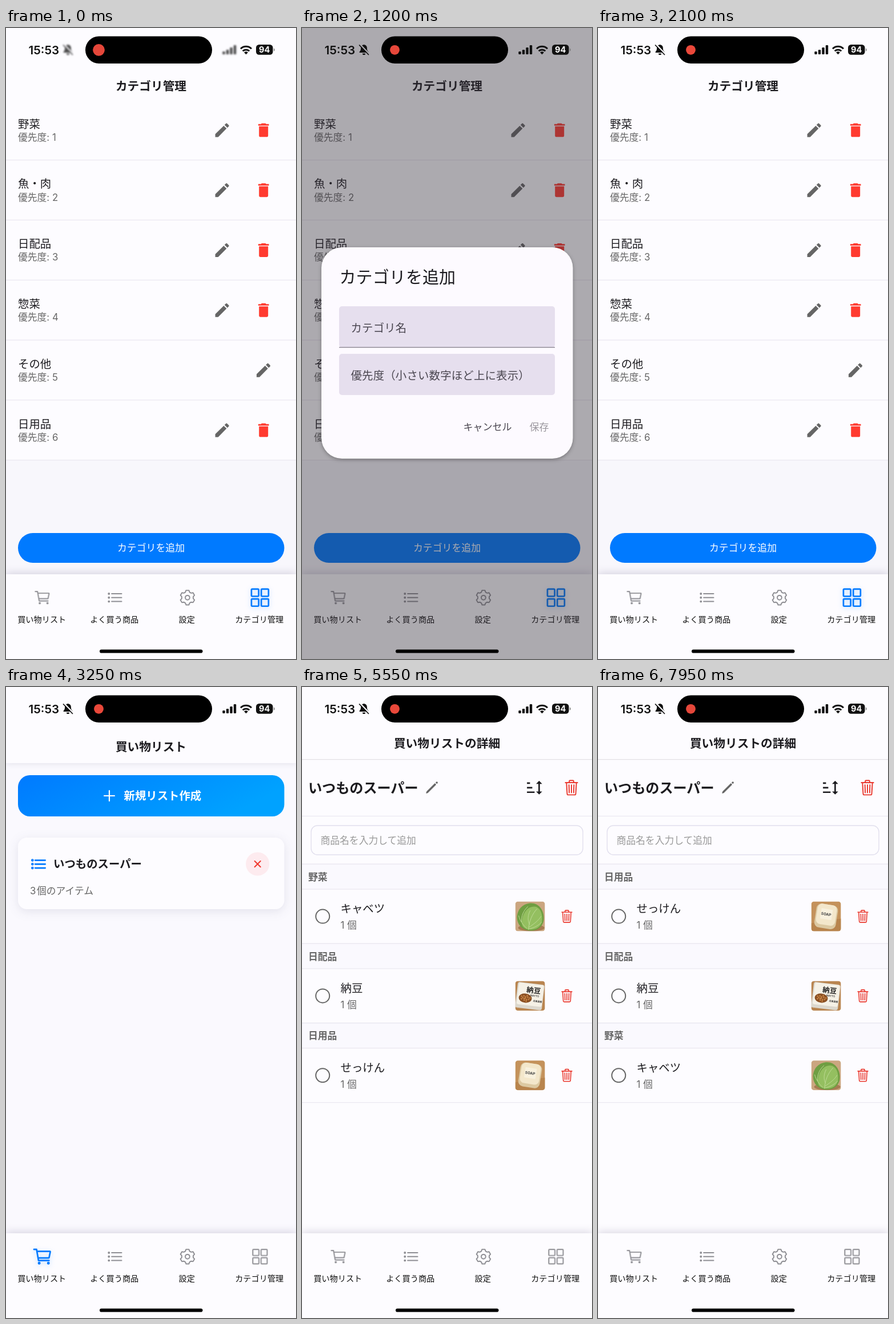
Write an HTML page that moves like this. It is 508 px wide and 1102 px high and loops after 8000 ms.

```html
<!DOCTYPE html>
<html lang="ja">
<head>
<meta charset="utf-8">
<title>買い物リスト</title>
<style>
  html, body { margin: 0; width: 100%; height: 100%; overflow: hidden; background: #fdfcff; }
  svg { display: block; width: 100%; height: 100%; }
  text { font-family: Inter, "Noto Sans CJK JP", "Noto Sans CJK", sans-serif; white-space: pre; }
  .line { fill: none; stroke-linecap: round; stroke-linejoin: round; }
  .bar { filter: drop-shadow(0 -3px 7px rgba(60, 45, 95, .17)); }
  .card { filter: drop-shadow(0 4px 9px rgba(50, 45, 90, .11)); }
  .glow { filter: drop-shadow(0 2px 4px rgba(0, 122, 255, .25)); }
  .head { filter: drop-shadow(0 2px 4px rgba(50, 45, 90, .1)); }
  .pop { filter: drop-shadow(0 2px 3px rgba(50, 40, 90, .38)); }
  .sheet { filter: drop-shadow(0 2px 3px rgba(0, 0, 0, .3)); }
  #menu { transform-origin: 441px 141px; }
</style>
</head>
<body>
<svg id="stage" viewBox="0 0 508 1102" preserveAspectRatio="none"></svg>
<script>
const LOOP = 8000;
const BG = '#fdfcff', SOFT = '#faf9fe', INK = '#1c1b1f', GREY = '#666', BLUE = '#007aff', RED = '#ff3b30';

// ---- drawing helpers ----
// Text is placed by the vertical middle of its characters.
const text = (x, mid, str, size, { fill = INK, weight = 400, anchor = 'start', gap = 0 } = {}) =>
  `<text x="${x}" y="${mid + size * 0.38}" font-size="${size}" fill="${fill}" font-weight="${weight}" text-anchor="${anchor}" letter-spacing="${gap}">${str}</text>`;
const rect = (x, y, w, h, r, fill, extra = '') =>
  `<rect x="${x}" y="${y}" width="${w}" height="${h}" rx="${r}" fill="${fill}" ${extra}/>`;
const rule = (y, color = '#eae7f0') => rect(0, y - 0.6, 508, 1.2, 0, color);
const group = (id, body, extra = '') => `<g id="${id}" ${extra}>${body}</g>`;
const at = (cx, cy, scale, box, body, extra = '') =>
  `<g transform="translate(${cx} ${cy}) scale(${scale}) translate(${-box / 2} ${-box / 2})" ${extra}>${body}</g>`;
const outline = (cx, cy, size, body, color, width = 32) =>
  at(cx, cy, size / 512, 512, body, `class="line" stroke="${color}" stroke-width="${width}"`);

// ---- icons ----
const pencil = (x, y) => at(x, y, 1.34, 24,
  '<path d="M20.7 7a1 1 0 0 0 0-1.4l-2.3-2.3a1 1 0 0 0-1.4 0l-1.9 1.8 3.8 3.8zM3 17.2V21h3.8L17.8 9.9 14.1 6.2z"/>', `fill="${GREY}"`);
const bin = (x, y) => at(x, y, 1.33, 24,
  '<path d="M19 4h-3.5l-1-1h-5l-1 1H5v2h14zM6 19a2 2 0 0 0 2 2h8a2 2 0 0 0 2-2V7H6z"/>', `fill="${RED}"`);
const sorter = (x, y) => at(x, y, 1.33, 24,
  '<path d="M18 21l-4-4h3V7h-3l4-4 4 4h-3v10h3M2 19v-2h10v2M2 13v-2h7v2M2 7V5h4v2z"/>', `fill="${INK}"`);
const trash = (x, y, size) => outline(x, y, size,
  '<path d="M112 112l20 320c1 18 14 32 32 32h184c18 0 31-14 32-32l20-320M80 112h352M192 112V72a24 24 0 0 1 24-24h80a24 24 0 0 1 24 24v40M256 176v224M184 176l8 224M328 176l-8 224"/>', '#ea392f');

const gearPath = () => {
  const pts = [];
  for (let k = 0; k < 6; k++)
    for (const [deg, r] of [[-21, 168], [-11.4, 214], [11.4, 214], [21, 168]]) {
      const a = (k * 60 + deg) * Math.PI / 180;
      pts.push(`${(256 + r * Math.sin(a)).toFixed(1)} ${(256 - r * Math.cos(a)).toFixed(1)}`);
    }
  return `M${pts.join('L')}Z`;
};
const shapes = {
  cart: '<path d="M48 80h64l48 272h256M160 288h249a8 8 0 0 0 8-6l29-144a8 8 0 0 0-8-10H128"/><circle cx="176" cy="416" r="16"/><circle cx="400" cy="416" r="16"/>',
  list: [144, 256, 368].map(y => `<path d="M160 ${y}h288"/><circle cx="80" cy="${y}" r="16"/>`).join(''),
  gear: `<path d="${gearPath()}"/><circle cx="256" cy="256" r="64"/>`,
  grid: [[48, 48], [288, 48], [48, 288], [288, 288]].map(([x, y]) => rect(x, y, 176, 176, 20, 'none')).join('')
};

// ---- thumbnails ----
const photos = {
  soap: rect(0, 0, 52, 52, 0, '#c4925b') + '<path d="M0 38L52 30V52H0z" fill="#b8844d"/>' +
    '<g transform="rotate(9 26 26)">' + rect(7, 5, 38, 42, 9, '#dcc9a2') + rect(9, 5, 34, 36, 8, '#f3e7cb') +
    rect(16, 13, 20, 18, 1, '#f8f1de') + text(25.5, 22, 'SOAP', 6.5, { weight: 700, anchor: 'middle', fill: '#444' }) + '</g>',
  natto: rect(0, 0, 52, 52, 0, '#b98550') + '<g transform="rotate(7 26 26)">' + rect(2, 4, 47, 45, 4, '#dcd8ce') +
    rect(4, 5, 44, 38, 3, '#f5f1e6') + text(31, 15.5, '納豆', 12.5, { weight: 900, anchor: 'middle', fill: '#222' }) +
    text(34, 25, 'NATTO', 4.5, { weight: 600, anchor: 'middle', fill: '#333' }) +
    '<ellipse cx="18" cy="31" rx="11.5" ry="8" fill="#8a4f22"/>' +
    Array.from({ length: 14 }, (_, i) => `<circle cx="${18 + 2.3 * Math.sqrt(i) * Math.cos(i * 2.4)}" cy="${31 + 1.6 * Math.sqrt(i) * Math.sin(i * 2.4)}" r="1.4" fill="#c58243"/>`).join('') +
    text(32, 34, '北海道産', 4, { weight: 700, fill: '#333' }) + '</g>',
  cabbage: rect(0, 0, 52, 52, 0, '#cba680') + '<ellipse cx="28" cy="46" rx="23" ry="6" fill="#a67c52"/>' +
    '<path d="M3 27C4 12 15 3 28 3S50 15 50 29 40 51 27 51 3 42 3 27z" fill="#6f9e42"/>' +
    '<path d="M12 32C14 17 24 8 34 9S48 22 47 33 36 50 25 49 10 42 12 32z" fill="#94bf60"/>' +
    '<path class="line" stroke="#bcd993" stroke-width="1" d="M23 49C24 36 29 22 38 13M25 40C21 32 22 24 26 16M24 45C33 39 41 33 45 26M24 48C33 46 41 42 46 36M20 47C14 41 8 34 6 25M11 36C10 26 14 16 22 9"/>'
};
const photo = (name, y) => `<g transform="translate(373.6 ${y - 26})" clip-path="url(#thumb)">${photos[name]}</g>`;

// ---- category page ----
const categoryPage = () => {
  const names = ['野菜', '魚・肉', '日配品', '惣菜', 'その他', '日用品'];
  const rows = names.map((name, i) => {
    const y = 178.4 + i * 104.8;
    const icons = name === 'その他' ? pencil(451, y) : pencil(378.6, y) + bin(451.2, y);
    return text(21, y - 11.2, name, 19.4) + text(21, y + 12, `優先度: ${i + 1}`, 16.8, { fill: GREY }) + icons + rule(y + 52.2);
  });
  return rect(0, 0, 508, 1102, 0, BG) + rect(0, 754, 508, 200, 0, '#f8f7fc') +
    text(254, 101, 'カテゴリ管理', 20.7, { weight: 600, anchor: 'middle' }) + rows.join('') +
    rect(21, 882, 466.5, 52, 26, BLUE) +
    text(254, 908, 'カテゴリを追加', 16.9, { fill: '#fff', weight: 500, anchor: 'middle' });
};

// ---- list page ----
const listPage = () =>
  rect(0, 0, 508, 1102, 0, SOFT) + rect(0, 0, 508, 133, 0, BG, 'class="head"') +
  text(254, 104.5, '買い物リスト', 20.7, { weight: 600, anchor: 'middle' }) +
  rect(21, 154, 466.5, 72, 21, 'url(#sky)') +
  '<path class="line" stroke="#fff" stroke-width="2.2" d="M172 190h18M181 181v18"/>' +
  text(206.5, 190, '新規リスト作成', 19.4, { fill: '#fff', weight: 600 }) +
  rect(21, 263, 466.5, 125, 15.5, BG, 'class="card"') +
  outline(57, 309.3, 31, shapes.list, BLUE, 46) +
  text(83, 309, 'いつものスーパー', 19.4, { weight: 600 }) +
  '<circle cx="440.7" cy="309" r="20.6" fill="#fdebef"/><path class="line" stroke="#f0392f" stroke-width="2" d="M435.6 304l10.2 10.2M445.8 304l-10.2 10.2"/>' +
  text(42, 356, '3', 16.8, { fill: GREY }) + text(54, 356, '個のアイテム', 16.8, { fill: GREY });

// ---- detail page ----
const items = { soap: 'せっけん', natto: '納豆', cabbage: 'キャベツ' };
const sections = { soap: '日用品', natto: '日配品', cabbage: '野菜' };
const itemRow = (key, y) =>
  `<circle cx="36.2" cy="${y}" r="12" fill="none" stroke="${GREY}" stroke-width="2"/>` +
  text(67.5, y - 13.5, items[key], 19.4) + text(67.5, y + 15.3, '1 個', 16.8, { fill: GREY }) +
  photo(key, y) + trash(464, y, 25.9) + rule(y + 47.5);
const plainRows = keys => keys.map((key, i) => itemRow(key, 356.6 + i * 95)).join('');
const groupedRows = keys => keys.map((key, i) => {
  const top = 309.3 + i * 138.8;
  return rect(0, top, 508, 43.6, 0, SOFT) + text(11, top + 22.2, sections[key], 16.8, { fill: GREY, weight: 600 }) +
    rule(top) + rule(top + 43.8) + itemRow(key, top + 91.3);
}).join('');

const detailPage = () =>
  rect(0, 0, 508, 1102, 0, BG) + rule(126.6, '#e2dfe5') +
  text(254, 98, '買い物リストの詳細', 20.7, { weight: 600, anchor: 'middle' }) +
  text(11, 176, 'いつものスーパー', 24.1, { weight: 600 }) +
  at(227.6, 175.5, 26 / 512, 512,
    '<path d="M359 129L86 402 70 442l40-16 273-272zM413 75l-12 12 24 24 12-12a16 16 0 0 0 0-23l-1-1a16 16 0 0 0-23 0z"/>',
    `fill="${GREY}" stroke="${GREY}" stroke-width="32" stroke-linejoin="round"`) +
  sorter(407.4, 175.8) + trash(472, 175.8, 31) + rule(225.5) +
  rect(16, 242, 476, 51, 11, BG, 'stroke="#e2e0ee" stroke-width="1.4"') +
  text(32.5, 267.5, '商品名を入力して追加', 16.8, { fill: '#999' }) + rule(309.3) +
  group('created', plainRows(['soap', 'natto', 'cabbage'])) +
  group('ascending', groupedRows(['cabbage', 'natto', 'soap'])) +
  group('descending', groupedRows(['soap', 'natto', 'cabbage']));

const menu = () => {
  const labels = ['作成', '名前', 'カテゴリ'].flatMap(k => ['昇順', '降順'].map(d => `${k}順（${d}）`));
  return rect(228, 141.5, 213, 393.5, 5, BG, 'class="pop"') +
    labels.map((s, i) => text(249, 184 + i * 62.05, s, 19.4, { gap: 0.19 })).join('');
};

const dialog = () => {
  const soft = '#49454f';
  return rect(34, 383, 440.5, 369, 36, '#fdfaff', 'class="sheet"') +
    text(65.5, 434.5, 'カテゴリを追加', 29, { gap: 0.1 }) +
    rect(65, 486, 378, 72, 5, '#e6dfee') + rect(65, 557, 378, 1.4, 0, '#8d8793') +
    rect(65, 569, 378, 72, 5, '#e6dfee') +
    text(85.5, 524, 'カテゴリ名', 19.4, { fill: soft, gap: 0.19 }) +
    text(85.5, 607, '優先度（小さい数字ほど上に表示）', 19.4, { fill: soft, gap: 0.19 }) +
    text(282.5, 697, 'キャンセル', 17, { fill: soft, weight: 500 }) +
    text(398.5, 697, '保存', 17, { fill: '#99969c', weight: 500 });
};

// ---- tab bar and status bar ----
const tabBar = () => {
  const tabs = [['cart', '買い物リスト'], ['list', 'よく買う商品'], ['gear', '設定'], ['grid', 'カテゴリ管理']];
  return rect(0, 954, 508, 160, 0, BG, 'class="bar"') + tabs.map(([icon, label], i) => {
    const x = 63.9 + i * 127;
    const idle = group(`${icon}Idle`, outline(x, 994.8, 31, shapes[icon], '#8e8e93'));
    const active = icon === 'cart' || icon === 'grid'
      ? group(`${icon}On`, outline(x, 994.8, 36.8, shapes[icon], BLUE, 37), 'class="glow"') : '';
    return idle + active + text(x - 1.2, 1033, label, 14.2, { fill: '#111', weight: 500, anchor: 'middle' });
  }).join('');
};

const statusBar = () =>
  `<text x="39.5" y="45.8" font-size="20.6" font-weight="600" fill="#111">15:53</text>` +
  group('fuzzy',
    `<g transform="translate(98.5 28)" fill="#111"><g mask="url(#cut)"><path d="M10 1.2c-3.3 0-5.4 2.5-5.4 5.8 0 4-1.2 5.4-2.4 6.6-.5.6-.2 1.5.6 1.5h14.4c.8 0 1.1-.9.6-1.5-1.2-1.2-2.4-2.6-2.4-6.6 0-3.3-2.1-5.8-5.4-5.8zM7.4 16.4h5.2a2.6 2.6 0 0 1-5.2 0z"/></g><path class="line" stroke="#111" stroke-width="1.7" d="M2 2l16 16.5"/></g>` +
    [5, 8, 12, 16].map((h, i) => rect(379.3 + i * 6.5, 46 - h, 4.4, h, 1.2, '#111')).join('')) +
  '<path fill="none" stroke="#111" stroke-width="3" d="M411 36.2a13.6 13.6 0 0 1 19 0M414.7 40.3a8.2 8.2 0 0 1 11.6 0"/><path fill="#111" d="M420.5 46.3l-3.4-3.6a4.8 4.8 0 0 1 6.8 0z"/>' +
  rect(438, 29, 29.5, 17.8, 5.4, '#111') + '<path d="M469 35.2a3.2 3.2 0 0 1 0 5.6z" fill="#777"/>' +
  '<text x="452.8" y="43.2" font-size="14.6" font-weight="700" fill="#fff" text-anchor="middle">94</text>' +
  rect(139, 14.5, 222, 47.5, 23.7, '#000') +
  '<circle id="dot" cx="162.5" cy="38.3" r="8.4" fill="#e5473a"/>' +
  rect(164, 1085.4, 180.5, 6.2, 3.1, '#000');

const defs = '<defs><clipPath id="thumb"><rect width="52" height="52" rx="5"/></clipPath>' +
  '<linearGradient id="sky" x1="0" y1="0" x2="1" y2="0.3"><stop stop-color="#007aff"/><stop offset="1" stop-color="#00a2ff"/></linearGradient>' +
  '<mask id="cut" maskUnits="userSpaceOnUse" x="0" y="0" width="20" height="21"><rect width="20" height="21" fill="#fff"/><path d="M3.4 0.8l16 16.5" stroke="#000" stroke-width="2.4"/></mask></defs>';

document.getElementById('stage').innerHTML = defs +
  group('categories', categoryPage()) + group('lists', listPage()) + group('detail', detailPage()) +
  tabBar() + group('menu', menu()) +
  group('shade', rect(0, 0, 508, 1102, 0, '#322f37')) + group('dialog', dialog()) + statusBar();

// ---- motion ----
const TAB = 2500, OPEN = 3500, SORT_UP = 5050, SORT_DOWN = 6900;
const OUT = 'cubic-bezier(.215,.61,.355,1)', STD = 'cubic-bezier(.4,0,.2,1)';
const el = id => document.getElementById(id);

// steps: [ms, properties, easing towards the next step]
const play = (id, steps) => {
  const frames = steps.map(([ms, props, easing = 'linear']) => ({ ...props, offset: ms / LOOP, easing }));
  frames.push({ ...steps[steps.length - 1][1], offset: 1 });
  el(id).animate(frames, { duration: LOOP, iterations: Infinity });
};
const show = (id, from, to) => {
  const marks = [[0, from === 0], [from, true], [to, false]].filter(([ms], i) => ms < LOOP && (i !== 1 || ms > 0));
  play(id, marks.map(([ms, on]) => [ms, { opacity: on ? 1 : 0 }, 'step-end']));
};

show('categories', 0, TAB);
show('gridOn', 0, TAB);
show('gridIdle', TAB, LOOP);
show('lists', TAB, OPEN);
show('cartOn', TAB, OPEN);
play('cartIdle', [[0, { opacity: 1 }, 'step-end'], [TAB, { opacity: 0 }, 'step-end'], [OPEN, { opacity: 1 }]]);
show('detail', OPEN, LOOP);
show('created', OPEN, SORT_UP);
show('ascending', SORT_UP, SORT_DOWN);
show('descending', SORT_DOWN, LOOP);

const fade = (id, max, start, end) => play(id, [
  [0, { opacity: 0 }], [start, { opacity: 0 }, OUT], [start + 220, { opacity: max }],
  [end, { opacity: max }, OUT], [end + 220, { opacity: 0 }]
]);
fade('shade', 0.4, 547, 1660);
fade('dialog', 1, 540, 1671);

const small = { opacity: 0, transform: 'scale(0)' }, full = { opacity: 1, transform: 'scale(1)' };
const gone = { opacity: 0, transform: 'scale(1)' };
play('menu', [[0, small], ...[[4200, SORT_UP], [5950, SORT_DOWN]].flatMap(([a, b]) => [
  [a, small, STD], [a + 250, full], [b, full, STD], [b + 250, gone, 'step-end'], [b + 251, small]
])]);

play('fuzzy', [[0, { filter: 'blur(1.4px)', opacity: 0.75 }], [220, { filter: 'blur(0px)', opacity: 1 }]]);
play('dot', [[0, { r: '10.4px' }, OUT], [300, { r: '8.4px' }]]);
el('dot').animate([{ fill: '#e5473a' }, { fill: '#ff4a3b' }],
  { duration: LOOP / 14, iterations: Infinity, direction: 'alternate', easing: 'ease-in-out' });
</script>
</body>
</html>
```
